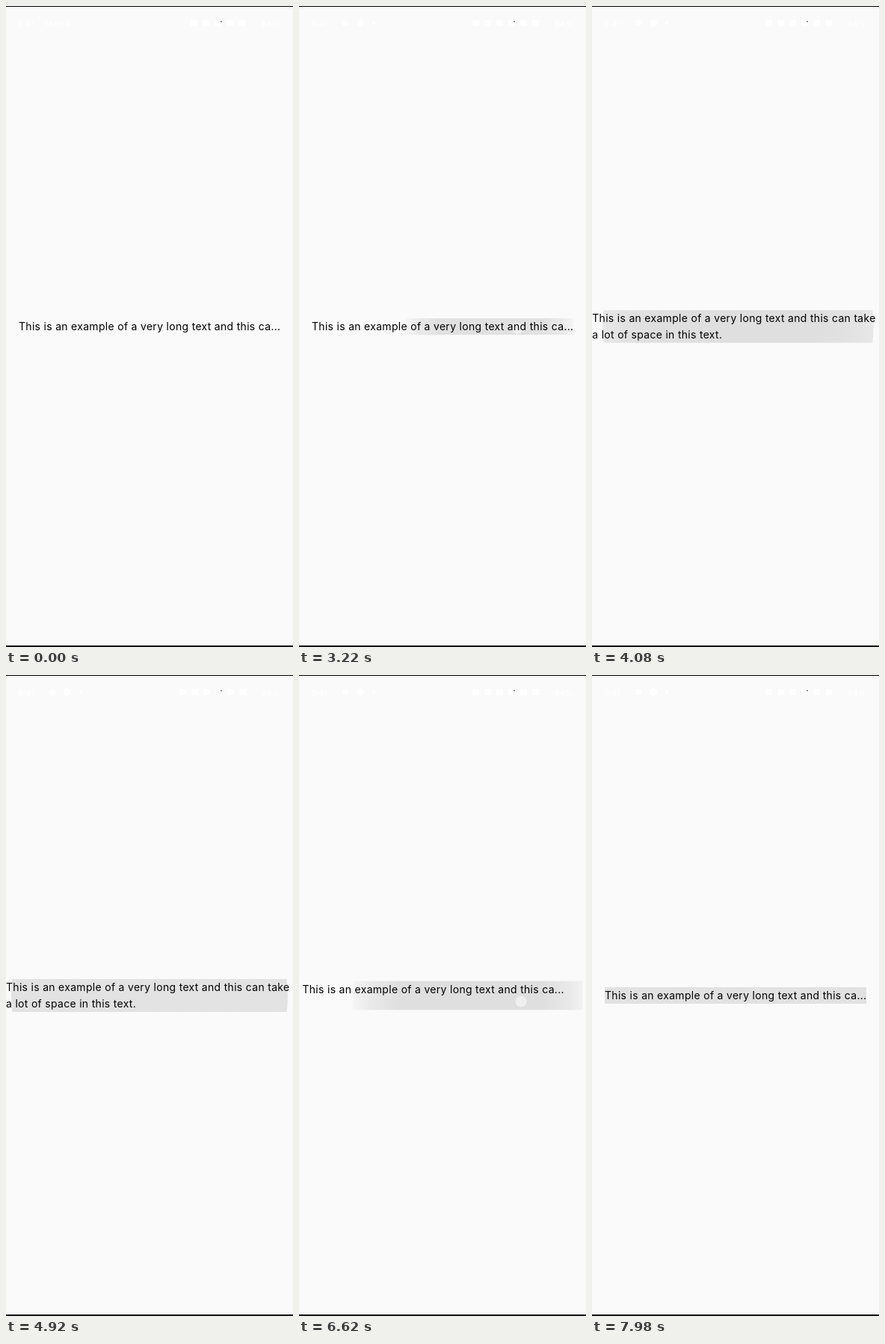
Recreate the animation shown at these times as an HTML page with a canvas. Size 384 by 856 pixels, loop 8000 ms.

```html
<!DOCTYPE html>
<html lang="en">
<head>
<meta charset="utf-8">
<title>Expanding text</title>
<style>
  html, body { margin: 0; width: 100%; height: 100%; overflow: hidden; background: #fafafa; }
  canvas { display: block; }
</style>
</head>
<body>
<canvas id="stage" width="384" height="856"></canvas>
<script>
const ctx = document.getElementById('stage').getContext('2d');
const LOOP = 8000, CENTER = { x: 192, y: 428 };
const SHORT = ['This is an example of a very long text and this ca...'];
const LONG = ['This is an example of a very long text and this can take', 'a lot of space in this text.'];
const taps = [
  { down: 2840, click: 3511, x: 292, y: 430.5, radius: 185 },
  { down: 5960, click: 6531, x: 297, y: 436, radius: 202 }
];

const clamp = v => Math.max(0, Math.min(1, v));
const lerp = (a, b, k) => a + (b - a) * k;
const shade = a => `rgba(0,0,0,${a})`;

// Critically damped spring from 0 to 1.
function spring(ms) {
  const k = Math.max(0, ms) * 0.011;
  return 1 - (1 + k) * Math.exp(-k);
}

function disc(x, y, r, fill, stroke) {
  ctx.beginPath();
  ctx.arc(x, y, r, 0, Math.PI * 2);
  ctx.fillStyle = fill;
  ctx.fill();
  if (stroke) {
    ctx.strokeStyle = stroke;
    ctx.stroke();
  }
}

function label(text, x, y, size, spacing, color) {
  ctx.font = `${size}px Inter, sans-serif`;
  ctx.letterSpacing = spacing + 'px';
  ctx.fillStyle = color;
  ctx.fillText(text, x, y);
}

function drawStatusBar(t) {
  label('9:41', 16, 28, 11, 0, '#fff');
  if (t < 510) label('Mon 4', 52, 28, 11, 0, '#fff');
  else {
    if (t >= 1790) disc(62, 23, 4, '#fff');
    disc(82, 23, 5, '#fff');
    disc(100, 23, 2, '#fff');
  }
  ctx.fillStyle = '#fff';
  for (let x = t < 510 ? 247 : 232; x < 325; x += 16) ctx.fillRect(x, 19, 9, 8);
  label('84%', 342, 28, 11, 0, '#fff');
  ctx.fillStyle = '#777';
  ctx.fillRect(287, 20, 2, 1.5);
}

function drawRipple(tap, t) {
  const age = t - tap.down;
  const alpha = 0.11 * clamp((age - 100) / 300) * clamp((3200 - age) / 1300);
  if (!alpha) return;
  const grow = 1 - (1 - clamp((age - 100) / 1400)) ** 2;
  const x = lerp(tap.x, CENTER.x, grow), y = lerp(tap.y, CENTER.y, grow);
  const r = tap.radius * lerp(0.4, 1, grow);
  const settle = clamp((age - 800) / 700);
  const fill = ctx.createRadialGradient(x, y, 0, x, y, r);
  fill.addColorStop(0, shade(alpha));
  fill.addColorStop(0.6, shade(alpha));
  fill.addColorStop(0.85, shade(alpha * lerp(0.6, 1, settle)));
  fill.addColorStop(1, shade(alpha * lerp(0.15, 1, settle)));
  disc(x, y, r, fill);
}

function drawTouch(tap, t) {
  if (t < tap.down || t > tap.click + 250) return;
  const edge = 0.9 * (1 - clamp((t - tap.down - 100) / 300));
  disc(tap.x, tap.y, 7.5, 'rgba(255,255,255,.5)', `rgba(185,212,238,${edge})`);
}

function draw(t) {
  ctx.fillStyle = '#fafafa';
  ctx.fillRect(0, 0, 384, 856);
  drawStatusBar(t);

  const [opened, closed] = taps.map(tap => tap.click);
  const open = t < closed ? spring(t - opened) : 1 - spring(t - closed);
  const left = lerp(17, 0, open), top = lerp(417, 406, open);
  const width = 384 - 2 * left, height = 2 * (CENTER.y - top);

  ctx.save();
  ctx.beginPath();
  ctx.rect(left, top, width, height);
  ctx.clip();
  taps.forEach(tap => drawRipple(tap, t));
  taps.forEach(tap => drawTouch(tap, t));
  const lines = t >= opened && t < closed ? LONG : SHORT;
  lines.forEach((line, i) => label(line, left, top + 16 + i * 21.5, 14, 0.3, '#000'));
  ctx.restore();

  ctx.fillStyle = '#000';
  ctx.fillRect(0, 0, 384, 1);
  ctx.fillRect(0, 854, 384, 2);
}

const start = performance.now();
function tick() {
  draw((performance.now() - start) % LOOP);
  requestAnimationFrame(tick);
}
tick();
</script>
</body>
</html>
```
